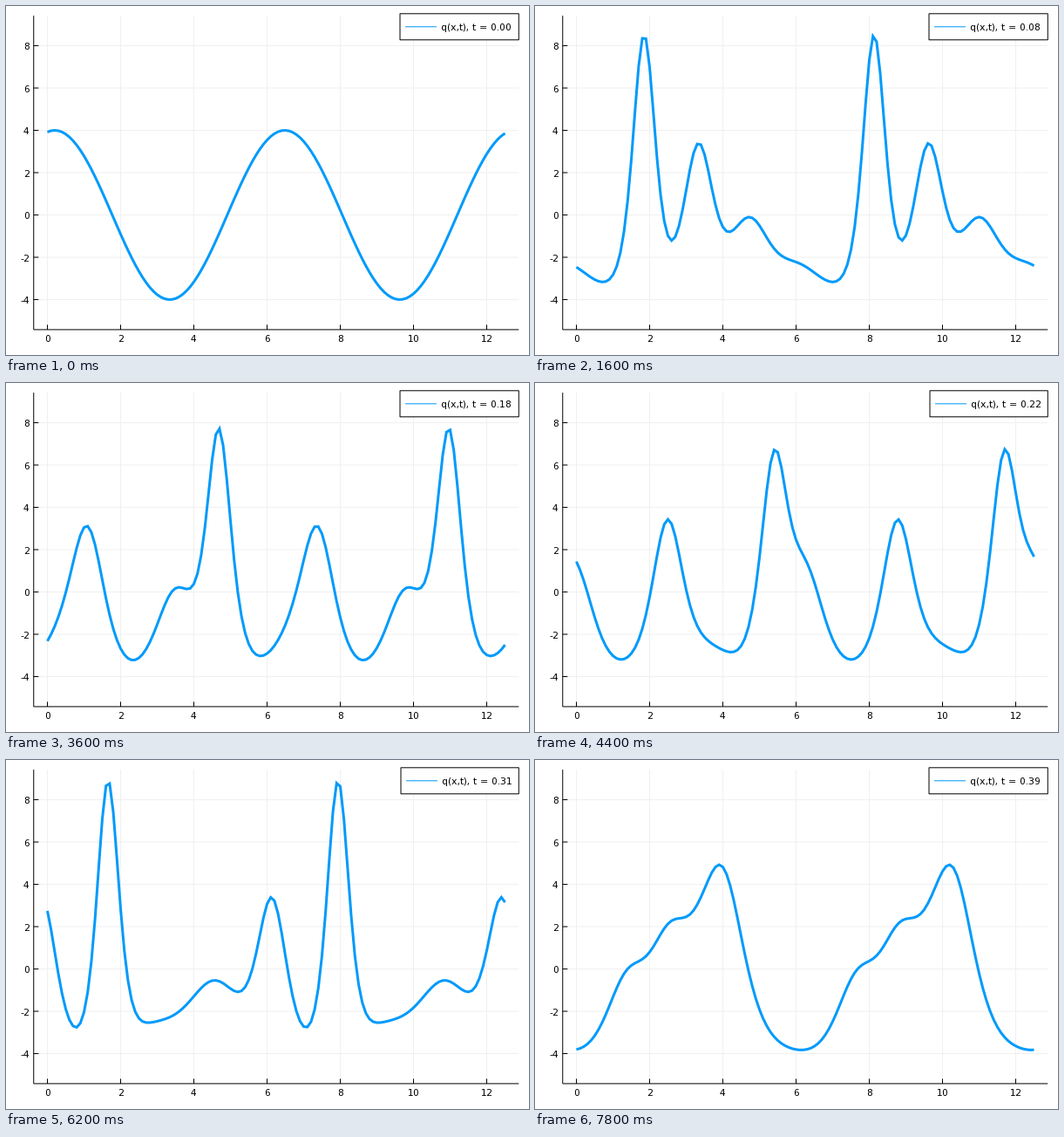
Write a matplotlib script that moves like this. It is 600 px wide and 400 px high and loops after 8 s.

```python
import numpy as np
import matplotlib.pyplot as plt
from matplotlib.animation import FuncAnimation
from matplotlib.patches import Rectangle

W, H, DPI = 600, 400, 100
PX = 72 / DPI
FRAMES, DT = 40, 0.01
LEFT, RIGHT, TOP, BOTTOM = 31.75, 588.25, 11.07, 370.93
XLIM, YLIM = (-0.375, 12.875), (-5.42, 9.42)
BLUE = "#009afa"
DRIFT, PHASE = 31.84, 0.2

# whole-pixel glyph advances
plt.rcParams["text.hinting_factor"] = 1


def to_px(x):
    return LEFT + (x - XLIM[0]) / (XLIM[1] - XLIM[0]) * (RIGHT - LEFT)


def to_py(y):
    return BOTTOM - (y - YLIM[0]) / (YLIM[1] - YLIM[0]) * (BOTTOM - TOP)


def solve_kdv(n=128, substeps=200):
    """Fourier coefficients of q_t = 6 q q_x + q_xxx, q(x, 0) = 4 cos x."""
    k = np.fft.fftfreq(n, 1 / n)
    h = DT / substeps
    half = np.exp(-0.5j * k**3 * h)
    full = half**2
    gain = 3j * k * (np.abs(k) < n / 3)

    def push(v):
        return gain * np.fft.fft(np.fft.ifft(v).real ** 2)

    v = np.fft.fft(4 * np.cos(2 * np.pi * np.arange(n) / n))
    states = [v / n]
    for _ in range(FRAMES - 1):
        for _ in range(substeps):
            a = push(v)
            b = push(half * (v + h / 2 * a))
            c = push(half * v + h / 2 * b)
            d = push(full * v + h * half * c)
            v = full * v + h / 6 * (full * a + 2 * half * (b + c) + d)
        states.append(v / n)
    return k, states


K, STATES = solve_kdv()
X = np.arange(126) * 0.1


def wave(i):
    s = X - PHASE - DRIFT * DT * i
    return (np.exp(1j * np.outer(s, K)) @ STATES[i]).real


fig = plt.figure(figsize=(W / DPI, H / DPI), dpi=DPI, facecolor="white")
ax = fig.add_axes([0, 0, 1, 1])
ax.set_xlim(0, W)
ax.set_ylim(H, 0)
ax.axis("off")


def stroke(xs, ys, color="black", width=1.0, **kw):
    return ax.plot(xs, ys, color=color, lw=width * PX, snap=False,
                   solid_capstyle="butt", **kw)[0]


def label(x, y, s, ha, **kw):
    return ax.text(x, y, s, ha=ha, va="baseline", fontsize=7.68,
                   family="DejaVu Sans", **kw)


for v in range(0, 13, 2):
    p = to_px(v)
    stroke([p, p], [TOP, BOTTOM], "#f0f0f0")
    stroke([p, p], [BOTTOM, BOTTOM - 5.6])
    label(p, 385, str(v), "center")
for v in range(-4, 9, 2):
    p = to_py(v)
    stroke([LEFT, RIGHT], [p, p], "#f0f0f0")
    stroke([LEFT, LEFT + 5.6], [p, p])
    label(27, p + 4.7, str(v), "right")
stroke([LEFT, LEFT], [TOP, BOTTOM])
stroke([LEFT, RIGHT], [BOTTOM, BOTTOM])

curve = stroke(to_px(X), to_py(wave(0)), BLUE, 3, zorder=3,
               solid_joinstyle="miter")

box = ax.add_patch(Rectangle((452, 8.8), RIGHT - 452, 30, fc="white",
                             ec="black", lw=PX, zorder=4, snap=False))
key = stroke([458, 494], [23.8, 23.8], BLUE, 1, zorder=5)
clock = label(499, 28, "", "left", zorder=5)


def draw(i):
    curve.set_ydata(to_py(wave(i)))
    text = f"q(x,t), t = {i * DT:.2f}"
    # the legend hugs its text, so a slim last digit narrows it
    slim = int(text[-1] in "12357")
    box.set_x(452 + slim)
    box.set_width(RIGHT - 452 - slim)
    key.set_xdata([458 + slim, 494 + slim])
    clock.set_x(499 + slim)
    clock.set_text(text)
    return curve, box, key, clock


anim = FuncAnimation(fig, draw, frames=FRAMES, interval=200,
                     repeat=True, repeat_delay=0, blit=False)
plt.show()
```
